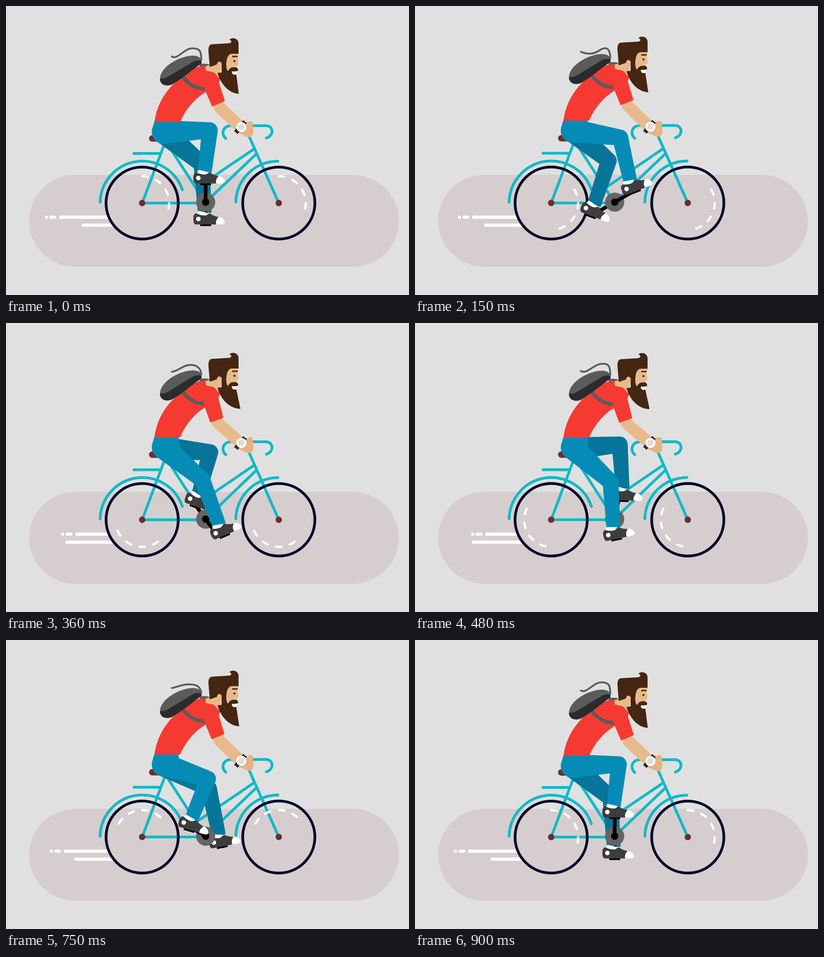
These frames come from a looping animation (882x635 px, 0.93 s). An HTML page:

```html
<!DOCTYPE html>
<html lang="en">
<head>
<meta charset="utf-8">
<title>Cyclist</title>
<style>
html, body { margin: 0; width: 100%; height: 100%; overflow: hidden; background: #e0e0e0; }
svg { display: block; width: 100vw; height: 100vh; }
.tube { fill: none; stroke: #10b9c9; stroke-width: 6; stroke-linecap: round; stroke-linejoin: round; }
.tyre { fill: none; stroke: #060b29; stroke-width: 6; }
.glint { fill: none; stroke: #fff; stroke-width: 5; stroke-linecap: round; stroke-dasharray: 12 18.9; }
.speed { fill: none; stroke: #fff; stroke-width: 7; }
.round { stroke-linecap: round; }
.strap { fill: none; stroke: #5b5b5b; stroke-linecap: round; }
.crank { stroke: #000; stroke-width: 8; }
.near { fill: #048cb6; }
.far { fill: #067599; }
.skin { fill: #e8ba8b; }
.red { fill: #f53a32; }
.hair { fill: #442613; }
.hub { fill: #6b2f2d; }
</style>
</head>
<body>
<svg viewBox="0 0 882 635">
  <defs>
    <g id="wheel">
      <circle class="tyre" r="79"/>
      <circle class="hub" r="7"/>
    </g>
    <path id="glint" class="glint" d="M0 -59A59 59 0 0 1 57.7 12.3"/>
    <g id="shoe">
      <path d="M4 11.5H28V15.5H4Z"/>
      <path fill="#fff" d="M-4 -10L0 -18L18 -14L27 -11L16 -3Z"/>
      <path fill="#3d3d3d" d="M-11 -1C-11 -9 -8 -13 -3 -12C4 -8 12 -7 17 -8C21 -10 23 -13 26 -12C31 -8 36 -6 46 -4L43 12H-5C-10 12 -11 6 -11 -1Z"/>
      <path fill="#fff" d="M45 -5C53 -3 58 3 58 7C58 11 54 12 50 12H39C37 5 41 -1 45 -5Z"/>
      <circle r="5" fill="#fff"/>
    </g>
  </defs>

  <rect x="50.5" y="371" width="809.5" height="202" rx="101" fill="#d6cece"/>
  <path id="lineA" class="speed"/>
  <path id="lineB" class="speed"/>
  <path id="dots" class="speed round"/>

  <g id="bike">
    <rect class="hub" x="313" y="284" width="42" height="14" rx="7"/>
    <path class="tube" d="M348 300L298 433H437L350 298M418 399L543 314M437 431L549 324M531 284L597 433M280 324H338"/>
    <path class="tube" d="M481 291C470 282 474 263 493 263H569C585 263 588 284 570 290"/>
    <path class="tube" d="M206 431A92.400 92.400 0 0 1 386 404M503 431A92 92 0 0 1 595 341"/>
    <g transform="translate(298 433)"><use class="spin" href="#glint"/><use href="#wheel"/></g>
    <g transform="translate(597 433)"><use class="spin" href="#glint"/><use href="#wheel"/></g>
  </g>

  <path id="farLeg" class="far"/>
  <path id="farCrank" class="crank"/>
  <use id="farShoe" href="#shoe"/>
  <circle cx="437" cy="431" r="21" fill="#646464"/>
  <path id="nearCrank" class="crank"/>
  <circle cx="437" cy="431" r="8"/>
  <path id="nearLeg" class="near"/>
  <path id="waist" class="near" d="M325 253H377L380 272L360 292H332L319.5 272Z"/>
  <use id="nearShoe" href="#shoe"/>

  <g id="body">
    <path id="loop" class="strap" stroke-width="4"/>
    <path class="red" d="M325 255C330 215 352 175 400 145C415 135 425 130 438 130L470 156L467 165L455 182C430 188 398 215 381 255Z"/>
    <path class="strap" stroke-width="5" d="M426 130Q436 128 445 131"/>
    <path class="strap" stroke-width="8" d="M388 157C400 173 415 182 438 182"/>
    <path fill="#5b5b5b" d="M337 158C340 132 380 110 408 109C422 109 429 114 428 126C400 146 385 160 364 172C348 179 336 171 337 158Z"/>
    <path fill="#2b2b2b" d="M337 159C344 161 351 158 357 154L410 122C417 119 424 119 428 121V126C400 146 385 160 364 172C348 179 336 171 337 159Z"/>
    <path class="skin" d="M437 132L462 126L472 130L468 158C460 156 462 148 452 145C446 143 441 144 437 141Z"/>
    <path class="skin" d="M476 102H509L507 117Q510 128 508 130Q506 132 504 131L505 150H478Z"/>
    <path class="hair" d="M446 134L443 98C443 88 446 84 452 84L485 82C494 82 496 77 489 74C496 67 509 72 509 82V105H493C485 107 482 116 482 132H472L460 129Z"/>
    <ellipse class="skin" cx="467" cy="131" rx="6" ry="9"/>
    <path id="beard" class="hair"/>
    <path fill="#fff" d="M494 142H505V150Q495 153 494 142Z"/>
    <path class="hair" d="M485 147C487 138 493 134 498 135C504 133 509 137 508 142C500 146 492 141 485 147Z"/>
    <path class="hair" d="M495 109.500H507V112.500H495Z"/>
    <circle class="hair" cx="500" cy="121" r="2.300"/>
  </g>

  <path id="forearm" fill="none" stroke="#e8ba8b" stroke-width="26" stroke-linecap="round"/>
  <g id="hand">
    <path fill="#e6b383" d="M516 257L538 253C542 258 540 262 541 270C543 282 538 289 531 288C524 287 520 283 509 280Z"/>
    <path stroke="#2b2b2b" stroke-width="10" d="M503 278L523 254"/>
    <circle cx="515" cy="266" r="9" fill="#dcdcdc" stroke="#fff" stroke-width="4"/>
  </g>
  <path id="sleeve" class="red" d="M432 172C433 144 458 134 465 165L479 209L451 221L434 181Z"/>
</svg>

<script>
const el = id => document.getElementById(id);
const set = (id, name, value) => el(id).setAttribute(name, value);
const spins = document.querySelectorAll('.spin');
const STEP = 30, LOOP = 930, TURN = 900;

// Smooth periodic curve through the values at the given times
function cycle(times, values, period) {
  const n = times.length;
  const time = k => times[(k + n) % n] + period * Math.floor(k / n);
  const value = k => values[(k + n) % n];
  const slope = k => (value(k + 1) - value(k - 1)) / (time(k + 1) - time(k - 1));
  return t => {
    t %= period;
    let i = n - 1;
    while (times[i] > t) i--;
    const h = time(i + 1) - time(i), u = (t - time(i)) / h, v = 1 - u;
    return value(i) * v * v * (1 + 2 * u) + value(i + 1) * u * u * (3 - 2 * u)
      + h * u * v * (slope(i) * v - slope(i + 1) * u);
  };
}
const TIMES = [0, 150, 360, 480, 600, 750];
const key = (...values) => cycle(TIMES, values, TURN);
const wave = (...values) => cycle([0, 150, 300, 360], values, TURN / 2);

const slideA = key(0, 9, 35.5, 37.5, 25.5, 10.5);
const slideB = key(0, 13.5, 35, 41, 33.5, 16);

const KNEE = 17.5;
const legs = [
  { id: 'far', phase: Math.PI, hip: [347, 279, 25],
    x: key(-16, -24, -7.5, -6.4, -15, -21), y: key(-8, -9.5, -8.6, -10, -5.5, -8.5),
    tilt: key(0, 21, 20, 2, -11, -11),
    kneeX: key(428, 424, 447, 448, 450, 444), kneeY: key(347, 340, 284, 267, 288, 326) },
  { id: 'near', phase: 0, hip: [345, 277, 26],
    x: key(-16, -13, -4.5, -4.6, -7, -9), y: key(-8, -6.5, -5.4, -9, -8.5, -7.5),
    tilt: key(0, -21.5, -23, -12, 6, 16.7),
    kneeX: key(446, 449, 430, 428, 427, 442), kneeY: key(273, 289, 345, 349, 336, 305) }
];

// Loose strap: start, two controls, middle, second control
const loopXY = [
  wave(363, 363, 363, 363), wave(111, 104, 109, 112),
  wave(375, 378, 372, 376), wave(119, 110, 108, 112),
  wave(390, 392, 383, 387), wave(93, 109, 101, 97),
  wave(408, 402, 400, 404), wave(93, 102, 101, 97),
  wave(427, 427, 424, 427), wave(101, 89, 105, 108)
];

// Tapered limb with a round start and a round or flat end
function limb(ax, ay, ra, bx, by, rb, flat) {
  const len = Math.hypot(bx - ax, by - ay);
  const nx = (ay - by) / len, ny = (bx - ax) / len;
  const at = (x, y, r) => `${x + nx * r} ${y + ny * r}`;
  const end = flat ? 'L' : `A${rb} ${rb} 0 0 0 `;
  return `M${at(ax, ay, ra)}L${at(bx, by, rb)}${end}${at(bx, by, -rb)}`
    + `L${at(ax, ay, -ra)}A${ra} ${ra} 0 0 0 ${at(ax, ay, ra)}Z`;
}

function drawLeg(leg, t, angle, hipShift) {
  const a = angle + leg.phase;
  const px = 437 + 45 * Math.sin(a), py = 431 - 45 * Math.cos(a);
  const x = px + leg.x(t), y = py + leg.y(t), tilt = leg.tilt(t);
  const c = Math.cos(tilt * Math.PI / 180), s = Math.sin(tilt * Math.PI / 180);
  const kx = leg.kneeX(t), ky = leg.kneeY(t);
  const [hx, hy, hr] = leg.hip;
  set(leg.id + 'Leg', 'd', limb(hx, hy + hipShift, hr, kx, ky, KNEE)
    + limb(kx, ky, KNEE, x + 14 * c + 13 * s, y + 14 * s - 13 * c, 15, true));
  set(leg.id + 'Crank', 'd', `M437 431L${px} ${py}`);
  set(leg.id + 'Shoe', 'transform', `translate(${x} ${y}) rotate(${tilt})`);
}

function draw(t) {
  const angle = 2 * Math.PI * t / TURN;
  const sway = (1 - Math.cos(angle)) / 2;
  const rise = 0.8 * sway + 3.2 * Math.sin(angle) ** 2;
  const k = 1 + 0.0085 * sway;
  const stretch = `translate(0 ${515 * (1 - k)}) scale(1 ${k})`;
  const lift = `${stretch} translate(0 ${-rise})`;

  const a = slideA(t), b = slideB(t);
  set('lineA', 'd', `M${119 + a} 464H225`);
  set('lineB', 'd', `M${168 - b} 481.500H235`);
  set('dots', 'd', `M${88.5 + a} 464h.01M${98.5 + a} 464h8M${119.5 + a} 464h5M${168.5 - b} 481.500h5`);

  set('bike', 'transform', stretch);
  spins.forEach(g => g.setAttribute('transform', `rotate(${360 * t / TURN})`));

  const hipShift = -2.2 * sway - rise;
  legs.forEach(leg => drawLeg(leg, t, angle, hipShift));
  set('waist', 'transform', `translate(0 ${hipShift})`);

  set('body', 'transform', lift);
  const p = loopXY.map(f => f(t));
  set('loop', 'd', `M${p[0]} ${p[1]}C${p.slice(2, 8).join(' ')}S${p[8]} ${p[9]} 427.500 118`);
  set('beard', 'd', `M472 128H482C482 138 484 146 490 142L494 143Q494 154 504 150`
    + `L${509.5 + 4 * sway} 193C488 192 470 172 463 147L472 146Z`);

  const handShift = -2.6 * sway;
  set('hand', 'transform', `translate(0 ${handShift})`);
  set('forearm', 'd', `M${467 - 4 * sway} ${222 - sway - rise}L512 ${265 + handShift}`);
  set('sleeve', 'transform', `${lift} translate(0 ${2 * sway}) rotate(${3.7 * sway} 449 155)`);
}

function tick() {
  const t = performance.now() % LOOP;
  draw(Math.floor(t / STEP) * STEP % TURN);
  requestAnimationFrame(tick);
}
tick();
</script>
</body>
</html>
```
